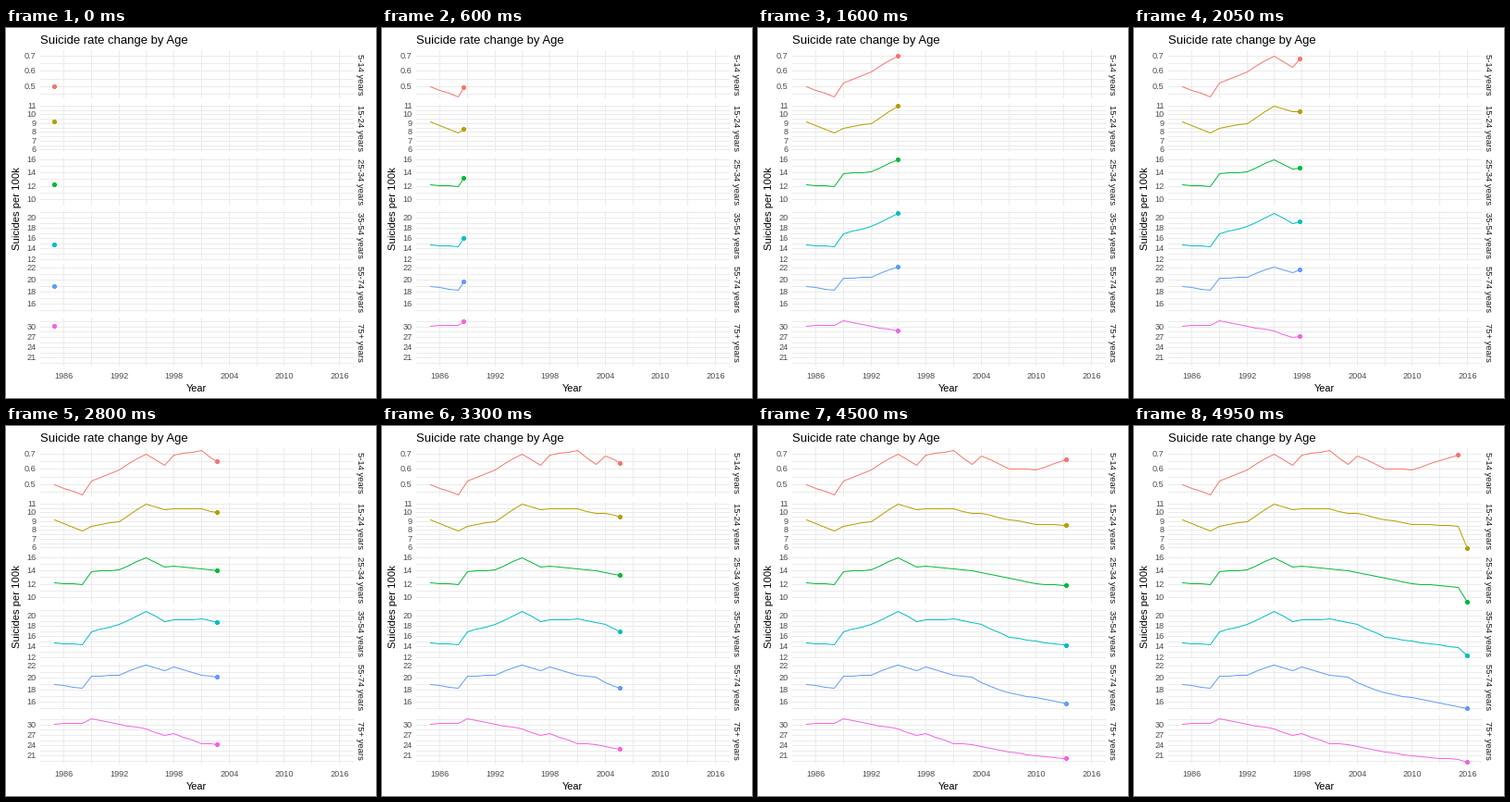
These frames come from a looping animation (400x400 px, 5 s). A matplotlib script:

```python
import numpy as np
import matplotlib.pyplot as plt
from matplotlib.animation import FuncAnimation
from matplotlib.patches import Circle

SIZE, DPI = 400, 100
PT = 72 / DPI
FRAMES, INTERVAL = 100, 50
START, SPAN = 1985, 31
LEFT, RIGHT = 37, 376
TOP, PANEL_H, PANEL_STEP = 24, 52.4, 57.85
EXPAND = 0.05
GRID, TICK, STRIP = "#EBEBEB", "#4D4D4D", "#1A1A1A"

# Turning points shared by all age groups, in years since START.
TURNS = [0, 3, 4, 7, 10, 12, 13, 16, 18, 19, 22, 25, 30, 31]

# Name, colour, step between labels, rate at each turning point.
GROUPS = [
    ("5-14 years", "#F8766D", 0.1,
     [.5, .433, .524, .597, .7, .627, .694, .72, .633, .688, .603, .597, .695]),
    ("15-24 years", "#B79F00", 1,
     [9.2, 7.95, 8.5, 9, 10.95, 10.3, 10.4, 10.4, 9.9, 9.9, 9.2, 8.7, 8.5, 5.95]),
    ("25-34 years", "#00BA38", 2,
     [12.2, 12, 13.9, 14.2, 15.98, 14.6, 14.7, 14.3, 14, 13.8, 12.9, 12.1, 11.6, 9.34]),
    ("35-54 years", "#00BFC4", 2,
     [14.8, 14.4, 17, 18.3, 20.92, 19, 19.3, 19.4, 18.7, 18.4, 15.9, 15.1, 13.9, 12.35]),
    ("55-74 years", "#619CFF", 2,
     [19, 18.3, 20.3, 20.5, 22.19, 21.2, 21.9, 20.5, 20.1, 19.2, 17.5, 16.7, 15.2, 14.86]),
    ("75+ years", "#F564E3", 3,
     [30.2, 30.5, 31.83, 30.1, 28.8, 26.9, 27.5, 24.6, 24.3, 23.9, 22.3, 21, 20, 19.2]),
]

plt.rcParams["font.family"] = "Liberation Sans"

fig = plt.figure(figsize=(SIZE / DPI, SIZE / DPI), dpi=DPI, facecolor="white")
ax = fig.add_axes([0, 0, 1, 1])
ax.set_xlim(0, SIZE)
ax.set_ylim(SIZE, 0)
ax.axis("off")

# The reveal reaches each year on a whole frame.
year_frames = np.round((FRAMES - 1) * np.arange(SPAN + 1) / SPAN)


def pixel(v):
    """Centre of the pixel nearest to v."""
    return np.floor(np.asarray(v) + 0.5) + 0.5


def year_x(year):
    return 52 + 9.935 * (np.asarray(year) - START)


def multiples(low, high, step, shift=0):
    """All values (k + shift) * step between low and high."""
    first = np.ceil(low / step - shift)
    last = np.floor(high / step - shift)
    return (np.arange(first, last + 1) + shift) * step


def label(x, y, text, size, color="black", ha="center", rotation=0):
    ax.text(x, y, text, fontsize=size * PT, color=color, ha=ha, va="baseline",
            rotation=rotation, rotation_mode="anchor")


class Panel:
    """One facet: grid, labels and a line that grows behind a dot."""

    def __init__(self, row, name, color, step, rates):
        self.top = TOP + row * PANEL_STEP
        self.last = TURNS[len(rates) - 1]
        self.rates = np.interp(np.arange(self.last + 1), TURNS[:len(rates)], rates)
        pad = EXPAND * (max(rates) - min(rates))
        self.low, self.high = min(rates) - pad, max(rates) + pad
        self.draw_frame(name, step)
        self.line, = ax.plot([], [], color=color, lw=PT, snap=False,
                             solid_joinstyle="round", zorder=3)
        self.dot = Circle((0, 0), 2, color=color, lw=0,
                          antialiased=False, zorder=4)
        ax.add_patch(self.dot)

    def rate_y(self, rate):
        return self.top + PANEL_H * (self.high - rate) / (self.high - self.low)

    def draw_frame(self, name, step):
        major = multiples(self.low, self.high, step)
        minor = multiples(self.low, self.high, step, 0.5)
        style = dict(colors=GRID, lw=PT, snap=False, zorder=1)
        ax.hlines(pixel(self.rate_y(np.append(major, minor))), LEFT, RIGHT, **style)
        ax.vlines(pixel(year_x(np.arange(1986, 2017, 3))),
                  self.top, self.top + PANEL_H, **style)
        for value in major:
            label(32.5, pixel(self.rate_y(value)) + 2.7, f"{value:g}", 9.2, TICK, "right")
        label(380, self.top + PANEL_H / 2, name, 9.5, STRIP, rotation=270)

    def reveal(self, frame):
        pos = min(np.interp(frame, year_frames, np.arange(SPAN + 1)), self.last)
        steps = np.append(np.arange(int(pos) + 1), pos)
        rates = np.interp(steps, np.arange(self.last + 1), self.rates)
        x = pixel(year_x(START + steps))
        y = pixel(self.rate_y(rates))
        self.line.set_data(x, y)
        self.dot.center = (x[-1], y[-1])
        return [self.line, self.dot]


panels = [Panel(row, *group) for row, group in enumerate(GROUPS)]

label(37, 17.5, "Suicide rate change by Age", 13.1, ha="left")
label(206, 393, "Year", 11)
label(15.3, 195.5, "Suicides per 100k", 11.2, rotation=90)
for year in range(1986, 2017, 6):
    label(year_x(year) + 0.5, 379, str(year), 9.2, TICK)


def update(frame):
    return [artist for panel in panels for artist in panel.reveal(frame)]


anim = FuncAnimation(fig, update, frames=FRAMES, interval=INTERVAL,
                     repeat=True, repeat_delay=0)
plt.show()
```
